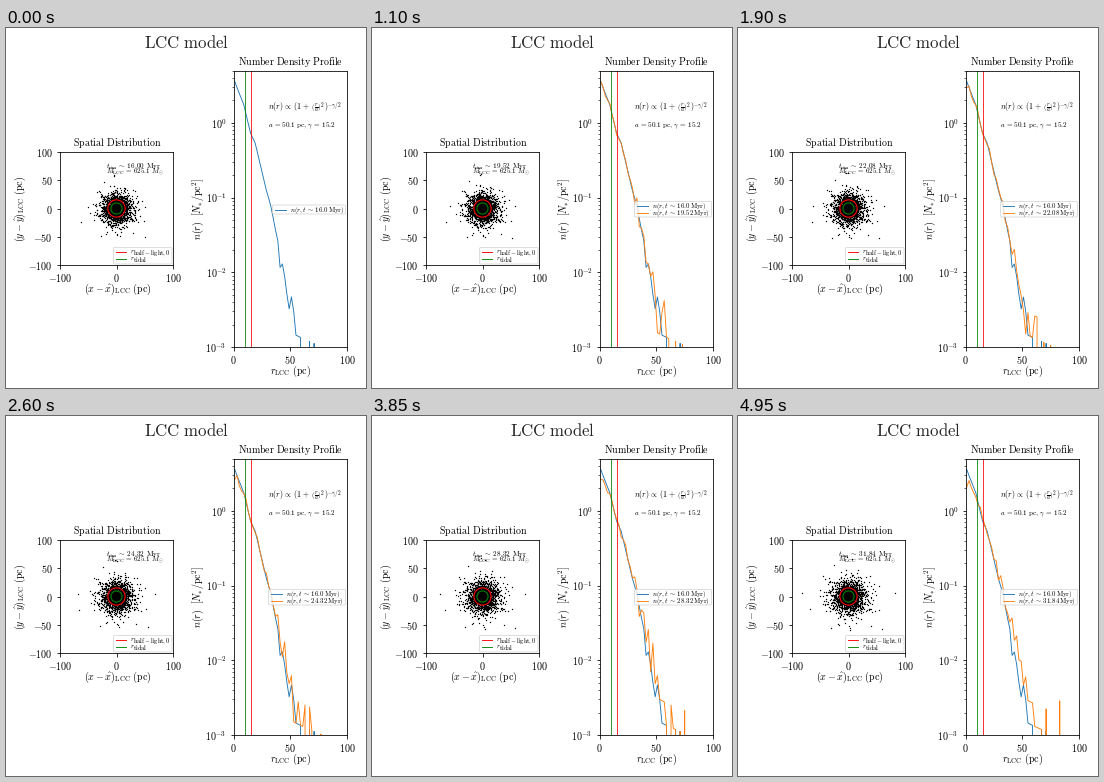
Recreate the animation shown at these times as a matplotlib script. Size 360 by 360 pixels, loop 5 s.

```python
import numpy as np
import matplotlib.pyplot as plt
from matplotlib.animation import FuncAnimation
from matplotlib.patches import Circle, FancyBboxPatch
from matplotlib.ticker import NullFormatter

SIZE, FRAMES, STEP_MS = 360, 100, 50
BLUE, ORANGE = "#1f77b4", "#ff7f0e"
HALF_LIGHT, TIDAL = 15.2, 9.8

plt.rcParams["mathtext.fontset"] = "cm"
rng = np.random.default_rng(16)

fig = plt.figure(figsize=(5, 5), dpi=72, facecolor="white")


def add_axes(x, y, w, h):
    """Axes placed by stage pixels, measured from the top left."""
    return fig.add_axes([x / SIZE, 1 - (y + h) / SIZE, w / SIZE, h / SIZE])


sky = add_axes(53.8, 123.8, 113.4, 113.4)
prof = add_axes(227.6, 42.6, 113.4, 276.5)
over = add_axes(0, 0, SIZE, SIZE)
over.set(xlim=(0, SIZE), ylim=(SIZE, 0), zorder=5)
over.axis("off")


def label(x, y, text, size, **kw):
    return over.text(x, y, f"${text}$", fontsize=size, **kw)


def roman(text):
    return r"\mathrm{" + text.replace(" ", r"\ ") + "}"


def box(x, y, w, h):
    patch = FancyBboxPatch((x, y), w, h, boxstyle="round,pad=0,rounding_size=1.2",
                           fc="white", ec="0.8", lw=0.8, alpha=0.8, zorder=1)
    return over.add_patch(patch)


def handle(x, y, color, length=11):
    return over.plot([x, x + length], [y, y], color=color, lw=0.9)[0]


# Star counts per 2 pc ring follow a few points of log10 n(r)
edges = np.arange(0, 102, 2)
radius = edges[:-1] + 1
area = 4 * np.pi * radius
knots_r = [1, 9, 15, 19, 29, 33, 39, 41, 43, 49, 51, 55, 59]
knots_n = [.55, .24, -.14, -.27, -.91, -1.12, -1.59, -1.95, -1.88, -2.5,
           -2.34, -2.83, -2.87]
counts = np.rint(area * 10 ** np.interp(radius, knots_r, knots_n, right=-9))
dist = np.repeat(radius, counts.astype(int)).astype(float)
dist += rng.uniform(-0.95, 0.95, dist.size)
dist = np.append(dist, [67, 71])

# Stars spread at random and, far out, stream away from the centre
angle = rng.uniform(0, 2 * np.pi, dist.size)
home = (dist * [np.cos(angle), np.sin(angle)]).T
stream = 0.16 * np.minimum(dist / 45, 1) ** 2
drift = rng.normal(0, 4, home.shape) + home * stream[:, None]

# Two stars near 50 pc escape to opposite sides
escape = np.argsort(abs(dist - 50.5))[:2]
course = np.radians([176, 4])
heading = np.column_stack([np.cos(course), np.sin(course)])
home[escape], drift[escape] = 50.5 * heading, 32 * heading


def positions(frame):
    return home + drift * frame / (FRAMES - 1)


def profile(frame):
    r = np.hypot(*positions(frame).T)
    return np.maximum(np.histogram(r, edges)[0] / area, 1e-99)


# Spatial panel
stars, = sky.plot([], [], "o", color="black", ms=1.35, mew=0)
for r, color in ((HALF_LIGHT, "red"), (TIDAL, "green")):
    sky.add_patch(Circle((0, 0), r, fill=False, ec=color, lw=1.1, zorder=4))
sky.set(xlim=(-100, 100), ylim=(-100, 100))
sky.set_xticks([-100, 0, 100], ["$-100$", "$0$", "$100$"])
ticks = range(-100, 101, 50)
sky.set_yticks(ticks, [f"${v}$" for v in ticks])

# Profile panel
prof.set_yscale("log")
prof.plot(radius, profile(0), color=BLUE, lw=0.9)
now_line, = prof.plot([], [], color=ORANGE, lw=0.9)
tidal_line = prof.axvline(TIDAL, color="green", lw=0.8)
prof.axvline(HALF_LIGHT, color="red", lw=0.8)
prof.set(xlim=(0, 100), ylim=(1e-3, 5))
prof.set_xticks([0, 50, 100], ["$0$", "$50$", "$100$"])
prof.set_yticks([1e-3, 1e-2, 1e-1, 1], [f"$10^{{{p}}}$" for p in range(-3, 1)])
prof.yaxis.set_minor_formatter(NullFormatter())

for ax in (sky, prof):
    ax.tick_params(labelsize=10)

# Titles and axis labels
mid = dict(ha="center")
side = dict(ha="center", va="center", rotation=90)
label(180.5, 20.5, roman("LCC model"), 16.8, color="0.15", **mid)
label(111, 118.2, roman("Spatial Distribution"), 10, **mid)
label(285, 37, roman("Number Density Profile"), 10, **mid)
label(111.5, 264, r"(x-\hat{x})_{\mathrm{LCC}}" + roman(" (pc)"), 10, **mid)
label(14, 180.5, r"(y-\hat{y})_{\mathrm{LCC}}" + roman(" (pc)"), 10, **side)
label(285, 346, r"r_{\mathrm{LCC}}" + roman(" (pc)"), 10, **mid)
label(192.5, 180.5, r"n(r)\ \ [N_{*}/\mathrm{pc}^2]", 10, **side)

# Notes
clock = label(100, 140.5, "", 7.2)
label(100, 145.6, r"M_{\mathrm{LCC}}\,=\,625.1\ M_{\odot}", 7)
label(262, 82.5, r"n(r)\,\propto\,\left(1\,+\,\left(\frac{r}{a}\right)^2\right)"
      r"^{-\gamma/2}", 7.8)
label(262, 99, r"a\,=\,50.1\ \mathrm{pc},\,\gamma\,=\,15.2", 7.1)

# Legends
box(107.5, 219.5, 58.5, 16.5)
for y, color, name in ((223.7, "red", "half-light,0"), (231, "green", "tidal")):
    handle(109.5, y, color, 10)
    label(124, y + 1.5, "r", 6.5)
    label(127, y + 2.5, roman(name), 6.3)

key_box = box(266.5, 177, 73, 9)
first_handle = handle(268, 181.5, BLUE)
first_text = label(284, 183.5, "", 6.8)
second_handle = handle(264.5, 185, ORANGE)
second_text = label(280, 187, "", 6.8)


def epoch(value):
    return rf"$n(r,t\,\sim\,{value}\,\mathrm{{Myr}})$"


first_text.set_text(epoch("16.0"))


def update(frame):
    time = 16 + 0.16 * frame
    stars.set_data(*positions(frame).T)
    clock.set_text(rf"$t_{{\mathrm{{sim}}}}\,\sim\,{time:.2f}\ \,\mathrm{{Myr}}$")
    tidal_line.set_xdata([TIDAL + 0.005 * frame] * 2)

    # The moving curve and its legend row join after the opening frame
    both = frame > 0
    for art in (now_line, second_handle, second_text):
        art.set_visible(both)
    now_line.set_data(radius, profile(frame))
    second_text.set_text(epoch(f"{time:.2f}"))

    x, y, top, height = (262.5, 177.6, 173.5, 15.5) if both else (266.5, 181.5, 177, 9)
    key_box.set_bounds(x, top, 339.5 - x, height)
    first_handle.set_data([x + 2, x + 13], [y, y])
    first_text.set_position((x + 17, y + 2))
    return ()


anim = FuncAnimation(fig, update, frames=FRAMES, interval=STEP_MS,
                     repeat=True, repeat_delay=0, blit=False)
plt.show()
```
